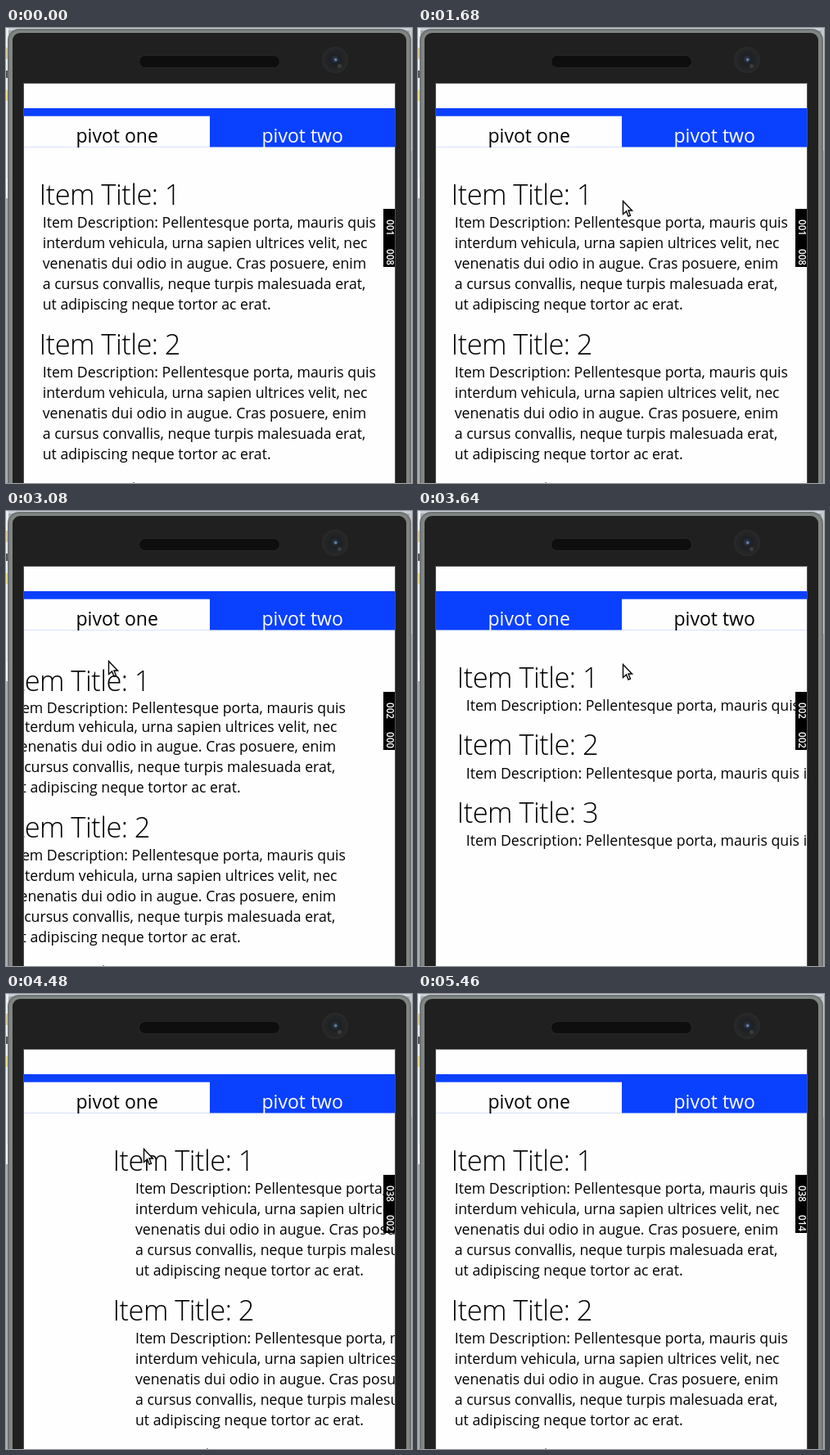
Write an HTML page with a canvas that moves like this. It is 496x556 px and loops after 5740 ms.

```html
<!DOCTYPE html>
<html lang="en">
<head>
<meta charset="utf-8">
<title>Pivot swipe</title>
<style>
  html, body { margin: 0; width: 100%; height: 100%; overflow: hidden; background: #a9adad; }
  canvas { display: block; }
</style>
</head>
<body>
<canvas id="stage" width="496" height="556"></canvas>
<script>
const c = document.getElementById('stage').getContext('2d');
const LOOP = 5740, STEP = 140;
const SCREEN = { x: 22, y: 68, w: 453, h: 488 };
const BLUE = '#0a40ff', INK = '#000', PAPER = '#fefefe';
const FONT = '"Open Sans", "Noto Sans", sans-serif';
const TO_TWO = 3220, TO_ONE = 4340;

const LINES = [
  'Item Description: Pellentesque porta, mauris quis',
  'interdum vehicula, urna sapien ultrices velit, nec',
  'venenatis dui odio in augue. Cras posuere, enim',
  'a cursus convallis, neque turpis malesuada erat,',
  'ut adipiscing neque tortor ac erat.'
];

// [time, x, y]
const POINTER = [
  [1120, 455, 458], [1680, 250, 211], [1960, 66, 166], [2240, 190, 188],
  [2660, 250, 188], [3080, 125, 183], [3220, 100, 185], [3640, 250, 187],
  [3920, 250, 188], [4200, 147, 189], [4340, 120, 190], [4760, 265, 187],
  [5040, 335, 300], [5320, 462, 556]
];
const ARROW = new Path2D('M0 0V16L4 12.5L6.5 18.5L9 17.5L6.5 11.5H11Z');

// [time, drag distance]
const DRAG_ONE = [[2660, 0], [2940, -20], [3080, -37], [3220, -453]];
const DRAG_TWO = [[3920, 0], [4060, -37], [4200, -445], [4340, -453]];

// [start time, upper value, lower value]
const COUNTERS = [
  [0, '001', '008'], [2800, '002', '000'], [TO_TWO, '002', '002'],
  [4060, '002', '000'], [TO_ONE, '038', '002'], [5040, '038', '014']
];

function along(keys, t) {
  if (t <= keys[0][0]) return keys[0].slice(1);
  for (let i = 1; i < keys.length; i++) {
    const a = keys[i - 1], b = keys[i];
    if (t <= b[0]) {
      const p = (t - a[0]) / (b[0] - a[0]);
      return a.slice(1).map((v, j) => v + (b[j + 1] - v) * p);
    }
  }
  return keys[keys.length - 1].slice(1);
}

// Incoming page: the remaining distance is quartered every `span` ms.
function settle(dt, span) {
  const d = SCREEN.w * 4 ** (-dt / span);
  return d < 0.6 ? 0 : d;
}

function rect(x, y, w, h, color) {
  c.fillStyle = color;
  c.fillRect(x, y, w, h);
}

function round(x, y, w, h, r, color) {
  c.fillStyle = color;
  c.beginPath();
  c.roundRect(x, y, w, h, r);
  c.fill();
}

function text(str, x, y, size, color = INK, weight = 400, spacing = 0) {
  c.font = `${weight} ${size}px ${FONT}`;
  c.letterSpacing = spacing + 'px';
  c.fillStyle = color;
  c.fillText(str, x, y);
}

function phone() {
  rect(0, 0, 496, 556, '#a9adad');
  rect(0, 0, 496, 3, '#c9d0dc');
  rect(0, 0, 3, 184, '#eceff2');
  rect(0, 24, 2, 14, '#d8c9a0');
  rect(0, 52, 2, 9, '#555');
  rect(0, 76, 2, 13, '#e6dc8c');
  rect(0, 184, 3, 24, '#fff');
  rect(493, 0, 3, 150, '#c3c9d2');
  round(2, 1, 493, 580, 14, '#6d7372');
  round(4, 3, 489, 580, 12, '#7f8583');
  round(8, 6, 481, 580, 9, '#202020');
  round(162, 33, 173, 16, 8, '#262626');
  round(163, 34, 171, 14, 7, '#0e0e0e');

  const lens = c.createRadialGradient(402, 38, 1, 402, 39, 16);
  lens.addColorStop(0, '#303a48');
  lens.addColorStop(0.3, '#1d2024');
  lens.addColorStop(0.8, '#252627');
  lens.addColorStop(1, '#2b2b2b');
  round(386, 23, 32, 32, 16, lens);
  round(401, 37, 3.5, 3.5, 2, '#6482b4');
  round(405, 44, 5, 5, 2.5, '#3a3c3e');

  rect(21, 67, 455, 489, '#505252');
  rect(SCREEN.x, SCREEN.y, SCREEN.w, SCREEN.h, PAPER);
}

function tabs(second) {
  rect(22, 98, 453, 47.5, BLUE);
  rect(second ? 249 : 22, 107.7, second ? 226 : 227, 38, PAPER);
  text('pivot one', 85.5, 139.5, 23, second ? '#fff' : INK);
  text('pivot two', 312.5, 139.5, 23, second ? INK : '#fff');
}

function pages(t, second) {
  let dx, titleDx, dragging;
  if (second) {
    const drag = along(DRAG_TWO, t)[0];
    dx = titleDx = drag || settle(t - TO_TWO, 140);
    dragging = drag < 0;
  } else if (t >= TO_ONE) {
    dx = settle(t - TO_ONE, 140);
    titleDx = settle(t - TO_ONE, 120);
  } else {
    dx = titleDx = along(DRAG_ONE, t)[0];
    dragging = dx < 0;
  }
  // The top of the list is pressed down a little while dragged.
  const dip = y => y + (dragging ? Math.max(0, (290 - y) / 15) : 0);
  const pitch = second ? 82.6 : 183;
  const lines = second ? [LINES[0] + ' int'] : LINES;

  for (let i = 0; i < 3; i++) {
    const top = 215.5 + i * pitch;
    text('Item Title: ' + (i + 1), 40.5 + titleDx, dip(top), 34.5, INK, 300, -0.55);
    lines.forEach((line, j) =>
      text(line, (second ? 51.7 : 44.7) + dx, dip(top + 28.5 + j * 24.9), 17.7));
  }
}

function counter(t) {
  const [, upper, lower] = COUNTERS.filter(k => k[0] <= t).pop();
  rect(461, 221, 14, 71, '#000');
  [[upper, 234], [lower, 270]].forEach(([str, y]) => {
    c.save();
    c.translate(464.5, y);
    c.rotate(Math.PI / 2);
    text(str, 0, 0, 11.7, '#fff', 600);
    c.restore();
  });
}

function pointer(t) {
  if (t < 1120 || t >= 5320) return;
  const [x, y] = along(POINTER, t);
  c.save();
  c.translate(Math.round(x) + 0.5, Math.round(y) + 0.5);
  c.fillStyle = '#fff';
  c.strokeStyle = '#000';
  c.lineWidth = 1.4;
  c.fill(ARROW);
  c.stroke(ARROW);
  c.restore();
}

function draw(now) {
  const t = Math.min(Math.floor((now % LOOP) / STEP) * STEP, 5460);
  const second = t >= TO_TWO && t < TO_ONE;
  phone();
  c.save();
  c.beginPath();
  c.rect(SCREEN.x, SCREEN.y, SCREEN.w, SCREEN.h);
  c.clip();
  tabs(second);
  pages(t, second);
  counter(t);
  c.restore();
  pointer(t);
}

const start = performance.now();
function tick() {
  draw(performance.now() - start);
  requestAnimationFrame(tick);
}
tick();
</script>
</body>
</html>
```
